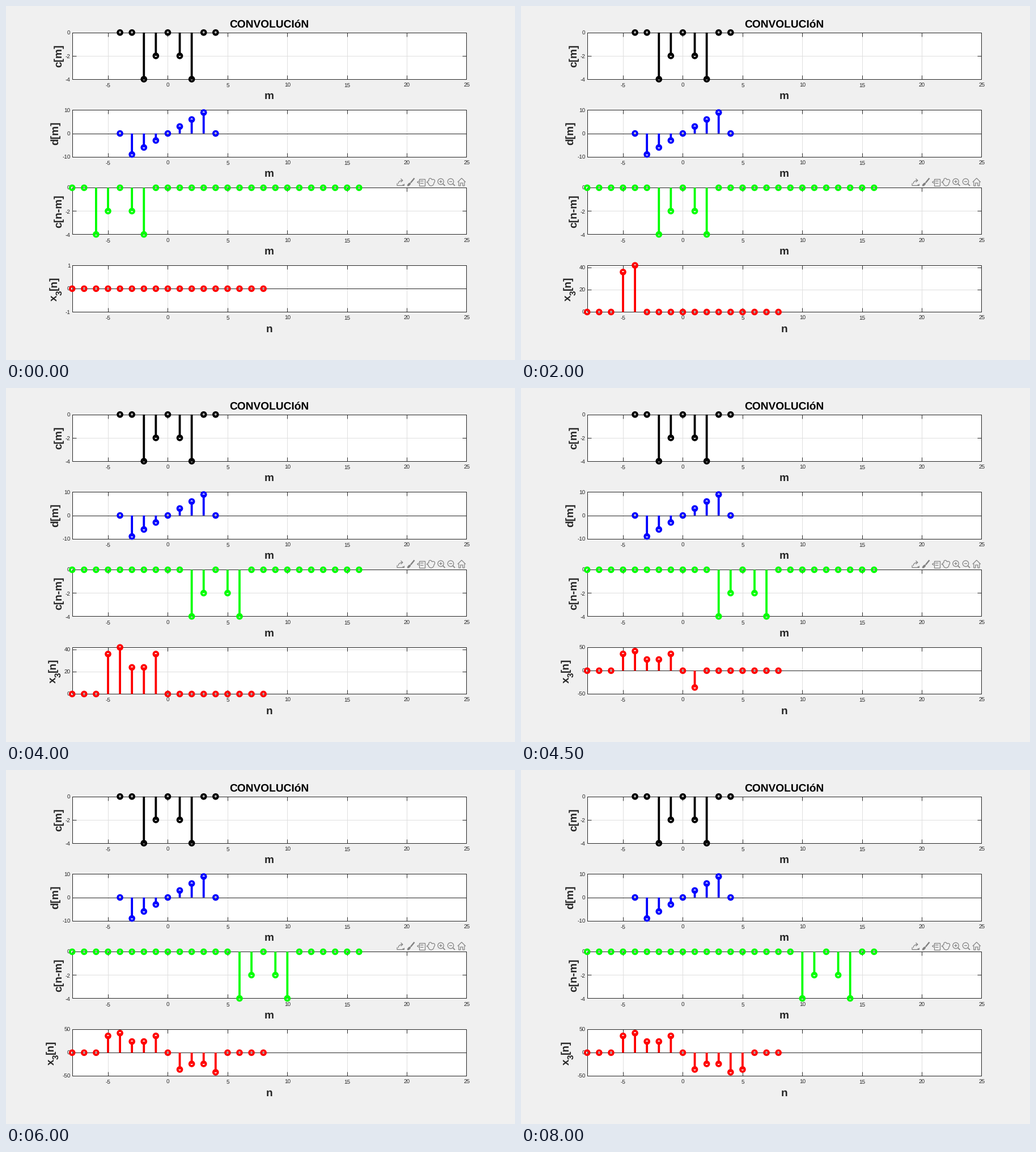
Animation of 898x624 px, one loop 8500 ms. Source, as a matplotlib script:

```python
import math

import numpy as np
import matplotlib.pyplot as plt
from matplotlib.animation import FuncAnimation
from matplotlib.patches import Circle, Ellipse, Rectangle

W, H, DPI = 898, 624, 100
PT = 72 / DPI                      # points per pixel
STEPS, STEP_MS = 17, 500

LEFT, WIDTH = 0.13 * W, 0.775 * W  # plot area in pixels
RIGHT, MIDDLE = LEFT + WIDTH, LEFT + WIDTH / 2
UNIT = WIDTH / 33                  # pixels per sample, m from -8 to 25
TOP, PITCH, HEIGHT = 46.8, 136.8, 82.2
TICK, STEM, RING = 7, 3.8, 3.9
INK, GRID, ICON = "#262626", "#dfdfdf", "#808080"
LABEL_SIZE, TICK_SIZE = 19.2, 10
CHAR = 0.556 * TICK_SIZE           # width of one digit

plt.rcParams["font.family"] = "Liberation Sans"
plt.rcParams["text.hinting"] = "no_hinting"
fig = plt.figure(figsize=(W / DPI, H / DPI), dpi=DPI, facecolor="#f0f0f0")
ax = fig.add_axes([0, 0, 1, 1])


def c(m):
    return -2 * abs(m) if abs(m) in (1, 2) else 0


def d(m):
    return 3 * m if abs(m) <= 3 else 0


def conv(n):
    return sum(d(m) * c(n - m) for m in range(-4, 5))


def px(m):
    return LEFT + (m + 8) * UNIT


def crisp(v):
    """Centre of the pixel that a thin line falls on."""
    return math.floor(v + 0.3) + 0.5


def line(xs, ys, color=INK, width=1.0, z=2, cap="butt"):
    ax.plot(xs, ys, color=color, lw=width * PT, zorder=z, snap=False,
            solid_capstyle=cap, solid_joinstyle="miter")


def text(x, y, s, size=LABEL_SIZE, color=INK, weight="bold", ha="center", rot=0):
    ax.text(x, y, s, fontsize=size * PT, color=color, weight=weight, ha=ha,
            va="baseline", rotation=rot, rotation_mode="anchor", zorder=4)


def panel(row, ylim, yticks, xlabel):
    """Draw the frame of one plot and return its value-to-pixel function."""
    top = TOP + row * PITCH
    bottom = top + HEIGHT
    lo, hi = ylim

    def py(v):
        return bottom - (v - lo) / (hi - lo) * HEIGHT

    l, r, t, b = (crisp(v) for v in (LEFT, RIGHT, top, bottom))
    ax.add_patch(Rectangle((l, t), r - l, b - t, fc="white", ec="none",
                           zorder=0, snap=False))
    for m in range(-5, 26, 5):
        x = crisp(px(m))
        line([x, x], [t, b], GRID, z=1)
        line([x, x], [t, t + TICK])
        line([x, x], [b - TICK, b])
        text(px(m), bottom + 14, str(m), TICK_SIZE, weight="normal")
    for v in yticks:
        y = crisp(py(v))
        line([l, r], [y, y], GRID, z=1)
        line([l, l + TICK], [y, y])
        line([r - TICK, r], [y, y])
        text(113.5, py(v) + 4, str(v), TICK_SIZE, weight="normal", ha="right")
    line([l, r, r, l, l], [t, t, b, b, t], z=3, cap="projecting")
    base = crisp(py(0))
    line([l, r], [base, base], z=3)
    text(MIDDLE, bottom + 35.5, xlabel)
    return py


def stems(ms, values, py, color):
    for m, v in zip(ms, values):
        if v:
            line([px(m)] * 2, [py(0), py(v)], color, STEM, 5)
        ax.add_patch(Circle((px(m), py(v)), RING, fill=False, ec=color,
                            lw=STEM * PT, zorder=6))


def side_label(x, row, s):
    text(x, TOP + row * PITCH + HEIGHT / 2, s, rot=90)


def result_label(x):
    """x_3[n], written upwards piece by piece."""
    y = 520.4
    for s, size, drop, advance in (("x", LABEL_SIZE, 0, 0.556),
                                   ("3", 0.8 * LABEL_SIZE, 8.5, 0.556),
                                   ("[n]", LABEL_SIZE, 0, 1.277)):
        text(x + drop, y, s, size, ha="left", rot=90)
        y -= advance * size


def shape(patch, width=1.2):
    patch.set(fill=False, ec=ICON, lw=width * PT, zorder=4)
    ax.add_patch(patch)


def stroke(xs, ys, width=1.2):
    line(xs, ys, ICON, width, 4)


def export_icon(x, y):
    stroke([x - 5, x - 5, x + 5, x + 5], [y + 2, y + 6, y + 6, y + 4])
    a = np.linspace(0, math.pi / 2, 10)
    stroke(x + 4 - 7 * np.cos(a), y + 3 - 6 * np.sin(a))
    stroke([x + 1.5, x + 5, x + 1.5], [y - 6, y - 3, y])
    ax.fill([x + 8, x + 8, x + 4], [y + 2.5, y + 6.5, y + 6.5], fc=ICON, zorder=4)


def brush_icon(x, y):
    stroke([x + 6.5, x], [y - 7, y + 1], 2.4)
    ax.add_patch(Ellipse((x - 3, y + 4), 8, 4, angle=-45, fc=ICON, zorder=4))


def tip_icon(x, y):
    shape(Rectangle((x - 4, y - 6), 10, 12))
    stroke([x - 4, x - 7, x - 4], [y - 2, y, y + 2])
    for dy in (-2, 2):
        stroke([x - 1.5, x + 4], [y + dy, y + dy])


def hand_icon(x, y):
    a = np.linspace(0, 2 * math.pi, 80)
    fingers = np.where(np.sin(a) > 0, 2.5 * np.abs(np.sin(2.5 * a)), 0)
    stroke(x + (5 + fingers) * np.cos(a), y + 1 - (5.5 + fingers) * np.sin(a))


def zoom_icon(x, y, plus):
    shape(Circle((x, y), 5.2))
    stroke([x - 2.5, x + 2.5], [y, y])
    if plus:
        stroke([x, x], [y - 2.5, y + 2.5])
    stroke([x + 3.8, x + 7.5], [y + 3.8, y + 7.5], 1.6)


def home_icon(x, y):
    stroke([x - 7, x, x + 7], [y, y - 7, y])
    for s in (-1, 1):
        stroke([x + 5 * s, x + 5 * s, x + 2 * s, x + 2 * s, x],
               [y - 1, y + 6.5, y + 6.5, y + 1.5, y + 1.5])


def toolbar():
    y = 310.5
    export_icon(695, y)
    brush_icon(714, y)
    tip_icon(732.5, y)
    hand_icon(750, y)
    zoom_icon(767, y - 1, True)
    zoom_icon(784.5, y - 1, False)
    home_icon(803.8, y)


def result_axis(shown):
    """Limits and ticks chosen from the values so far."""
    if min(shown) < 0:
        return (-50, 50), (-50, 0, 50)
    if max(shown) > 0:
        return (0, max(40, max(shown))), (0, 20, 40)
    return (-1, 1), (-1, 0, 1)


def label_shift(ticks):
    """The widest tick label pushes the axis label to the left."""
    return max(CHAR * (len(str(v)) - 0.4 * (v < 0)) for v in ticks)


def draw(k):
    ax.clear()
    ax.set(xlim=(0, W), ylim=(H, 0))
    ax.axis("off")
    text(MIDDLE, 38.8, "CONVOLUCIóN", color="black")

    short, wide, ns = range(-4, 5), range(-8, 17), range(-8, 9)
    low, even = (-4, -2, 0), (-10, 0, 10)
    edge = 106.9

    py = panel(0, (-4, 0), low, "m")
    stems(short, [c(m) for m in short], py, "black")
    side_label(edge - label_shift(low), 0, "c[m]")

    py = panel(1, (-10, 10), even, "m")
    stems(short, [d(m) for m in short], py, "#0000ff")
    side_label(edge - label_shift(even), 1, "d[m]")

    py = panel(2, (-4, 0), low, "m")
    stems(wide, [c(k - 4 - m) for m in wide], py, "#00ff00")
    side_label(edge - label_shift(low), 2, "c[n-m]")
    toolbar()

    shown = [conv(n) if n <= k - 8 else 0 for n in ns]
    ylim, yticks = result_axis(shown)
    py = panel(3, ylim, yticks, "n")
    stems(ns, shown, py, "#ff0000")
    result_label(edge - 8 - label_shift(yticks))
    return []


anim = FuncAnimation(fig, draw, frames=STEPS, interval=STEP_MS,
                     init_func=lambda: [], repeat=True, repeat_delay=0)
plt.show()
```
